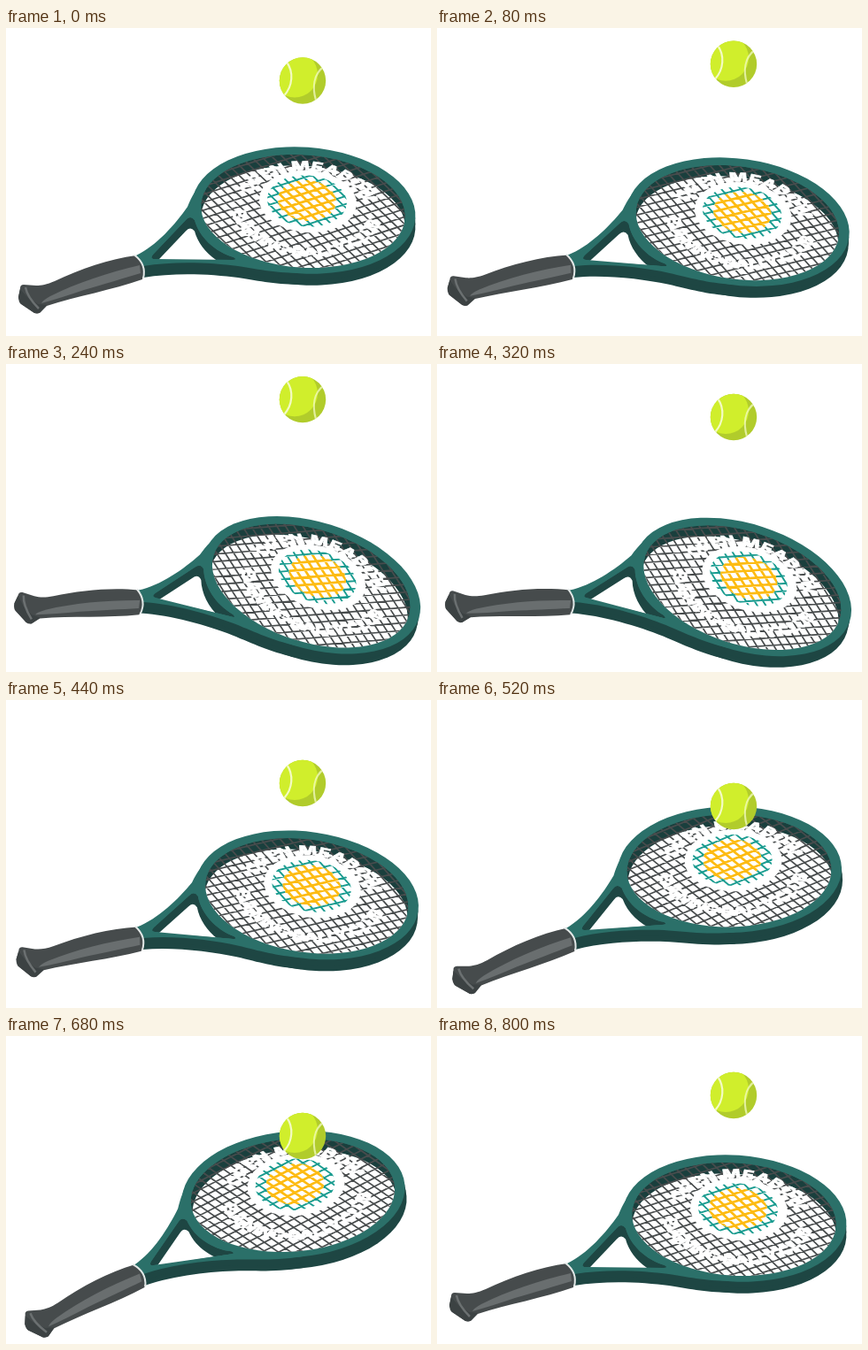
Animation of 480x348 px, one loop 0.84 s. Source, as an HTML page:

```html
<!DOCTYPE html>
<html lang="en">
<head>
<meta charset="utf-8">
<title>Tennis racket and ball</title>
<style>
  html, body { margin: 0; width: 100%; height: 100%; overflow: hidden; background: #fff; }
  svg { display: block; width: 480px; height: 348px; }
  .face { fill: #2b7069; }
  .side { fill: #1e4643; }
  .strings { fill: none; stroke: #484c4d; stroke-width: 1.7; }
  .print { font: 800 22px Inter, "Liberation Sans", sans-serif; fill: #fff; stroke: #fff; stroke-width: .8; text-anchor: middle; }
  .seam { fill: none; stroke: #f3fbc4; stroke-width: 2.2; }
</style>
</head>
<body>
<svg viewBox="0 0 480 348">
  <defs>
    <g id="frame">
      <ellipse cx="336.3" cy="206" rx="126.3" ry="71.3" transform="rotate(4 336.3 206)"/>
      <path d="M226 170C215 180 210 190 205 202C191 222 170 246 147 257L155 269C190 263 232 265 262 269C288 273 305 277 336 277L300 240Z"/>
    </g>
    <ellipse id="hole" cx="335.5" cy="207" rx="115.5" ry="63.7" transform="rotate(4 335.5 207)"/>
    <path id="gap" d="M203 217Q208 211 213 217C218 236 236 253 257 259Q262 262 256 262L168 261Q162 261 166 256Z"/>
    <clipPath id="inHole"><use href="#hole"/></clipPath>
    <clipPath id="inGap"><use href="#gap"/></clipPath>
    <clipPath id="inRing"><ellipse cx="340" cy="195.5" rx="45" ry="29" transform="rotate(4 340 195)"/></clipPath>
    <clipPath id="inDisc"><ellipse cx="340" cy="195" rx="33" ry="23" transform="rotate(4 340 195)"/></clipPath>
    <clipPath id="inBall"><circle r="26.2"/></clipPath>
    <path id="net"/>
    <path id="arcTop" d="M-66 0A66 66 0 0 1 66 0"/>
    <path id="arcLow" d="M-86 0A86 86 0 0 0 86 0"/>
  </defs>

  <g id="racket">
    <!-- frame -->
    <g class="side">
      <use href="#frame" y="13"/>
      <use href="#frame" y="7"/>
    </g>
    <use href="#frame" class="face"/>
    <g clip-path="url(#inGap)">
      <use href="#gap" class="side"/>
      <use href="#gap" y="12.500" fill="#fff"/>
    </g>

    <!-- string bed -->
    <g clip-path="url(#inHole)">
      <use href="#hole" fill="#1a3f3d"/>
      <use href="#hole" fill="#fff" y="12.500"/>
      <use href="#net" class="strings"/>
      <g class="print" transform="translate(340 203) rotate(4) scale(1 .64)">
        <text><textPath href="#arcTop" startOffset="50%">OPEN MEADOW</textPath></text>
        <text><textPath href="#arcLow" startOffset="50%">EVENING RALLY CLUB</textPath></text>
      </g>
      <ellipse cx="341" cy="196" rx="55" ry="35" fill="#fff" transform="rotate(4 341 196)"/>
      <g clip-path="url(#inRing)"><use href="#net" fill="none" stroke="#1a9c90" stroke-width="1.900"/></g>
      <g clip-path="url(#inDisc)">
        <rect x="300" y="165" width="80" height="60" fill="#fff"/>
        <use href="#net" fill="none" stroke="#fdbb12" stroke-width="2.700"/>
      </g>
    </g>

    <!-- grip -->
    <path fill="#464b4c" d="M147 257C117 261 84 272 55 286C46 290 40 291 34 291L20 290Q16 290 16 294L14 304Q14 309 17 312L32 322Q36 324 39 321L46 314C80 303 120 296 154 284Q158 271 147 257Z"/>
    <path fill="#696e6f" d="M151 268C116 276 80 288 50 303Q41 308 40 311Q62 305 88 296C112 289 132 283 152 277Z"/>
    <path fill="#3c4243" d="M16 295L24 304L36 312L46 313L38 322L32 322L16 311L14 304Z"/>
    <path fill="none" stroke="#6b7071" stroke-width="2.500" d="M22 293Q24 304 37 317"/>
    <path fill="none" stroke="#e3e8e7" stroke-width="2" d="M145 256.500Q159 267 155 283"/>
  </g>

  <g id="ball">
    <circle r="26.2" fill="#b1cc2b"/>
    <g clip-path="url(#inBall)">
      <circle cx="-9" cy="-7" r="26" fill="#d0ee2c"/>
      <path class="seam" d="M-18 -21C-10 -10 -11 6 -21 17"/>
      <path class="seam" opacity=".75" d="M24 -16C12 -7 11 8 15 22"/>
    </g>
  </g>
</svg>

<script>
const LOOP = 840, STEP = 40;
const el = id => document.getElementById(id);

// Parallel lines through the string bed at one angle.
function lines(deg, gap) {
  const a = deg * Math.PI / 180, c = Math.cos(a), s = Math.sin(a);
  let d = "";
  for (let i = -18; i <= 18; i++) {
    const x = 340 - s * gap * i, y = 195 + c * gap * i;
    d += `M${x - 150 * c} ${y - 150 * s}L${x + 150 * c} ${y + 150 * s}`;
  }
  return d;
}
el("net").setAttribute("d", lines(-18, 8.6) + lines(44, 8.2));

// Keys are [time, value].
const swing = [[0, 0], [160, 10.1], [300, 14.4], [440, 4.5], [520, -4.6], [610, -11.2], [680, -8.9], [800, 0]];
const height = [[0, 59.5], [160, 29.5], [320, 60], [440, 94], [520, 120], [600, 146], [680, 113], [800, 67]];

// Smooth periodic curve through the keys, flat at every turning point.
function sample(keys, t) {
  const n = keys.length;
  const key = i => {
    const [time, v] = keys[(i + n) % n];
    return [time + LOOP * Math.floor(i / n), v];
  };
  const slope = i => {
    const [t0, a] = key(i - 1), [, b] = key(i), [t1, c] = key(i + 1);
    return (b - a) * (c - b) <= 0 ? 0 : (c - a) / (t1 - t0);
  };
  let i = n - 1;
  while (keys[i][0] > t) i--;
  const [t0, a] = key(i), [t1, b] = key(i + 1);
  const h = t1 - t0, u = (t - t0) / h, w = 1 - u;
  return a + (b - a) * u * u * (3 - 2 * u) + h * u * w * (w * slope(i) - u * slope(i + 1));
}

const start = performance.now();
function draw() {
  const t = Math.floor((performance.now() - start) % LOOP / STEP) * STEP;
  el("racket").setAttribute("transform", `rotate(${sample(swing, t)} 155 268)`);
  el("ball").setAttribute("transform", `translate(335 ${sample(height, t)})`);
  requestAnimationFrame(draw);
}
draw();
</script>
</body>
</html>
```
